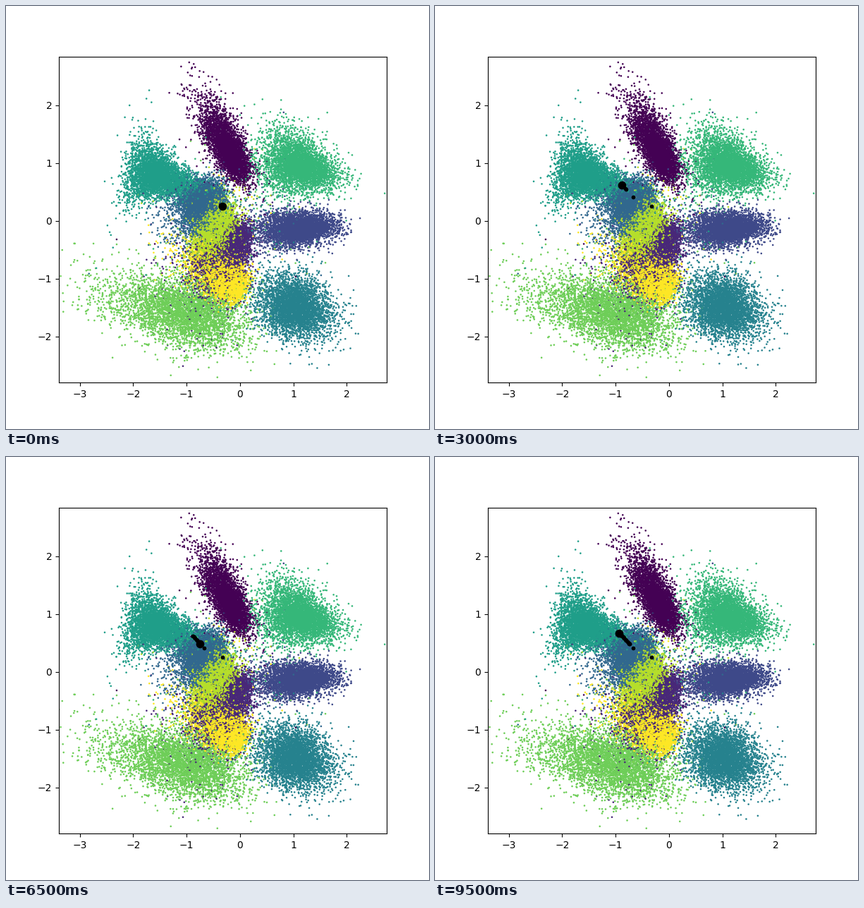
Animation of 600 by 600 pixels, one loop 10 s. Source, as a matplotlib script:

```python
import numpy as np
import matplotlib.pyplot as plt
from matplotlib.animation import FuncAnimation

FRAMES, INTERVAL = 20, 500
PER_CLUSTER = 4200
STRAY_SHARE = 0.012
DOT_SIZE = 3.5
rng = np.random.default_rng(7)


def cluster(x, y, length, width, angle, taper=0.0, skew=0.0):
    """Gaussian cloud along an axis: taper fans it out, skew stretches one end."""
    u, v, spread = rng.normal(size=(3, PER_CLUSTER))
    spread = np.exp(0.15 * spread)
    along = length * spread * (u + skew * (u * u - 1) / 2)
    across = width * spread * v * np.exp(taper * np.clip(u, -2, 2))
    c, s = np.cos(np.radians(angle)), np.sin(np.radians(angle))
    xy = np.column_stack([x + c * along - s * across, y + s * along + c * across])
    stray = rng.random(PER_CLUSTER) < STRAY_SHARE
    xy[stray] = rng.normal((-0.3, -0.1), (0.7, 0.6), (stray.sum(), 2))
    return xy


# Listed in colour order, from dark purple to yellow
clouds = [
    cluster(-0.24, 1.28, 0.37, 0.145, 120, taper=0.1, skew=0.2),
    cluster(-0.26, -0.60, 0.37, 0.20, 233, taper=0.3, skew=0.3),
    cluster(1.10, -0.13, 0.34, 0.14, 4, taper=-0.08),
    cluster(-0.73, 0.29, 0.25, 0.19, 225, taper=0.15, skew=0.2),
    cluster(1.03, -1.50, 0.34, 0.25, -20),
    cluster(-1.50, 0.76, 0.36, 0.20, 165, taper=0.35, skew=-0.25),
    cluster(1.10, 0.96, 0.36, 0.23, 160, taper=0.2),
    cluster(-1.13, -1.57, 0.65, 0.28, -13, skew=-0.15),
    cluster(-0.46, -0.20, 0.25, 0.17, 70),
    cluster(-0.32, -0.98, 0.30, 0.18, 145, taper=0.15, skew=0.4),
]
points = np.vstack(clouds)
label = np.repeat(np.arange(len(clouds)), PER_CLUSTER)
order = rng.permutation(len(points))

fig = plt.figure(figsize=(6, 6), dpi=100)
ax = fig.add_axes([0.125, 0.11, 0.775, 0.77])
ax.scatter(*points[order].T, c=label[order], cmap="viridis", s=DOT_SIZE, linewidths=0)
ax.set_xlim(-3.393, 2.749)
ax.set_ylim(-2.798, 2.836)

# The walker swings back and forth along a slope, pausing at two turns
key_steps = [0, 1, 2, 6, 7, 11, 12, 15, 19]
key_x = [-0.325, -0.667, -0.80, -0.88, -0.88, -0.735, -0.735, -0.765, -0.93]
walk_x = np.interp(np.arange(FRAMES), key_steps, key_x)
walk_y = -0.97 * walk_x - 0.235
walk_y[0] = 0.255
trail, = ax.plot([], [], "ko", ms=4.1, mew=0, zorder=3)
head, = ax.plot([], [], "ko", ms=8.4, mew=0, zorder=4)


def update(i):
    trail.set_data(walk_x[:i], walk_y[:i])
    head.set_data(walk_x[i:i + 1], walk_y[i:i + 1])
    return trail, head


anim = FuncAnimation(fig, update, frames=FRAMES, interval=INTERVAL, repeat=True, repeat_delay=0)
plt.show()
```
